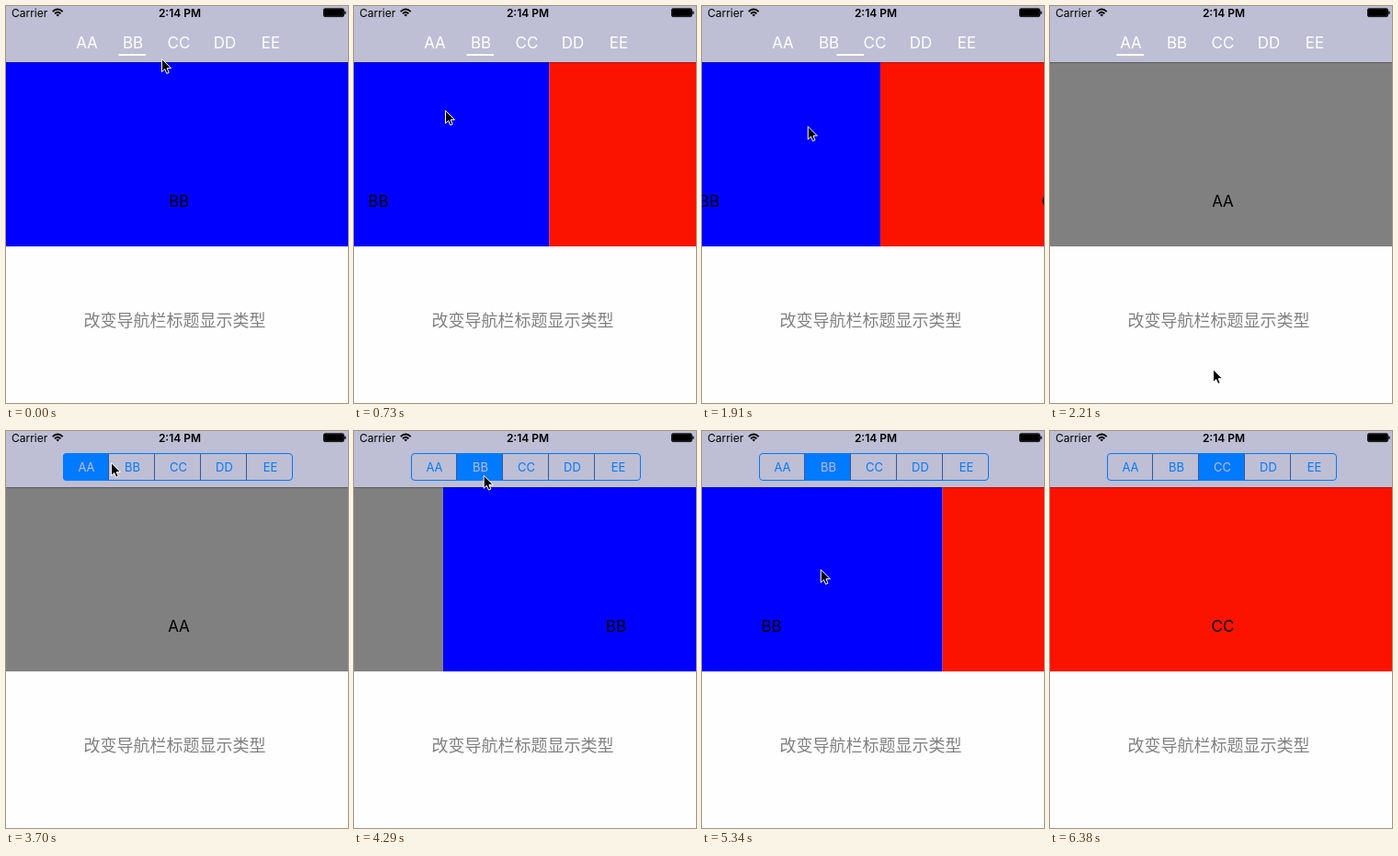
An HTML page that plays this animation: 372x431 px, repeating every 6530 ms.

```html
<!DOCTYPE html>
<html lang="zh">
<head>
<meta charset="utf-8">
<style>
html, body { margin: 0; width: 100%; height: 100%; overflow: hidden; background: #fefefe; }
svg { display: block; }
text { font: 17px Inter, "Liberation Sans", sans-serif; text-anchor: middle; }
#status text { font-size: 12px; }
#tabs { fill: #fff; }
#segments text { font-size: 13px; fill: #007aff; }
#segments text.on { fill: #bebed4; }
</style>
</head>
<body>
<svg width="372" height="431" viewBox="0 0 372 431">
  <rect width="372" height="431" fill="#fefefe"/>
  <g id="pages"></g>
  <rect width="372" height="61" fill="#bebed4"/>
  <rect y="61" width="372" height="1" opacity=".3"/>
  <g id="status">
    <text x="6" y="12" style="text-anchor:start">Carrier</text>
    <g fill="none" stroke="#000" stroke-width="1.8">
      <path d="M50.7 6.2Q56.2 .8 61.7 6.2M53 8.4Q56.2 5.2 59.4 8.4"/>
      <path d="M54.4 9.6Q56.2 8 58 9.6L56.2 11.5Z" fill="#000" stroke="none"/>
    </g>
    <text x="189" y="12" style="font-weight:600">2:14 PM</text>
    <rect x="345.5" y="2.8" width="22" height="8.8" rx="1.5" fill="#222" stroke="#000" stroke-width=".8"/>
    <rect x="346.5" y="3.8" width="20" height="6.8" rx=".6"/>
    <rect x="368.2" y="5.5" width="1.4" height="3.4" rx=".6"/>
  </g>
  <g id="tabs"><rect id="line" y="52" width="29.5" height="2"/></g>
  <g id="segments">
    <clipPath id="round"><rect x="62" y="24" width="250" height="30" rx="4"/></clipPath>
    <rect id="fill" y="24" width="50" height="30" fill="#007aff" clip-path="url(#round)"/>
    <path d="M111.5 25v28m50-28v28m50-28v28m50-28v28" stroke="#34599a"/>
    <rect x="62.5" y="24.5" width="249" height="29" rx="3.5" fill="none" stroke="#007aff"/>
  </g>
  <text x="183.5" y="348" fill="#808080" style="font:18px 'Noto Sans CJK SC','Noto Sans CJK',sans-serif">改变导航栏标题显示类型</text>
  <path id="cursor" d="M.5 .5V14.5L3.7 11.5L5.8 16.3L8.2 15.3L6.2 10.6H10.6Z" stroke="#fff"/>
</svg>
<script>
const $ = id => document.getElementById(id);
const LOOP = 6530, STEPS = 44, PITCH = 374;

function add(parent, tag, attrs, label = "") {
  const el = document.createElementNS("http://www.w3.org/2000/svg", tag);
  for (const name in attrs) el.setAttribute(name, attrs[name]);
  el.textContent = label;
  return $(parent).appendChild(el);
}

const labels = ["AA", "BB", "CC", "DD", "EE"];
labels.forEach((s, i) => add("tabs", "text", { x: 88 + 50 * i, y: 46 }, s));
const segmentTexts = labels.map((s, i) =>
  add("segments", "text", { x: 87.5 + 50 * i, y: 44 }, s));
["#808080", "#0000ff", "#fb1300"].forEach((fill, i) => {
  add("pages", "rect", { x: PITCH * i, y: 61, width: PITCH, height: 200, fill });
  add("pages", "text", { x: PITCH * i + 188, y: 218 }, labels[i]);
});

// Places where the pointer turns or rests: step, x, y.
const stops = [
  [0, 169, 57], [2, 258, 112], [5, 99, 113], [8, 100, 93], [11, 93, 38],
  [12, 93, 38], [15, 177, 394], [16, 177, 394], [19, 169, 336], [20, 169, 336],
  [25, 114, 34], [28, 134, 36], [33, 198, 149], [34, 268, 150], [37, 80, 150],
  [42, 190, 432]
];

// Smooth rise from 0 to 1 between two steps.
function ramp(from, to, step) {
  const p = Math.min(1, Math.max(0, (step - from) / (to - from)));
  return p * p * (3 - 2 * p);
}

function pointerAt(step) {
  const next = stops.findIndex(stop => stop[0] > step);
  if (next < 0) return stops.at(-1).slice(1);
  const [from, x, y] = stops[next - 1], [to, x2, y2] = stops[next];
  const p = ramp(from, to, step);
  return [x + (x2 - x) * p, y + (y2 - y) * p];
}

function draw(now) {
  const step = Math.floor(now % LOOP / LOOP * STEPS + .16) % STEPS;
  const segmented = step >= 21;
  const selected = step < 28 ? 0 : step < 39 ? 1 : 2;
  const back = 2 * ramp(12, 15, step);
  const page = 1 + ramp(2.5, 8, step) - back + ramp(27, 30, step) + ramp(34, 39.5, step);
  const tab = 1 + ramp(7, 9, step) - back;

  $("pages").setAttribute("transform", `translate(${-PITCH * page})`);
  $("cursor").setAttribute("transform", `translate(${pointerAt(step)})`);
  $("line").setAttribute("x", 72.5 + 50 * tab);
  $("fill").setAttribute("x", 62 + 50 * selected);
  $("tabs").style.display = segmented ? "none" : "";
  $("segments").style.display = segmented ? "" : "none";
  segmentTexts.forEach((el, i) => el.classList.toggle("on", i === selected));
  requestAnimationFrame(draw);
}
requestAnimationFrame(draw);
</script>
</body>
</html>
```
